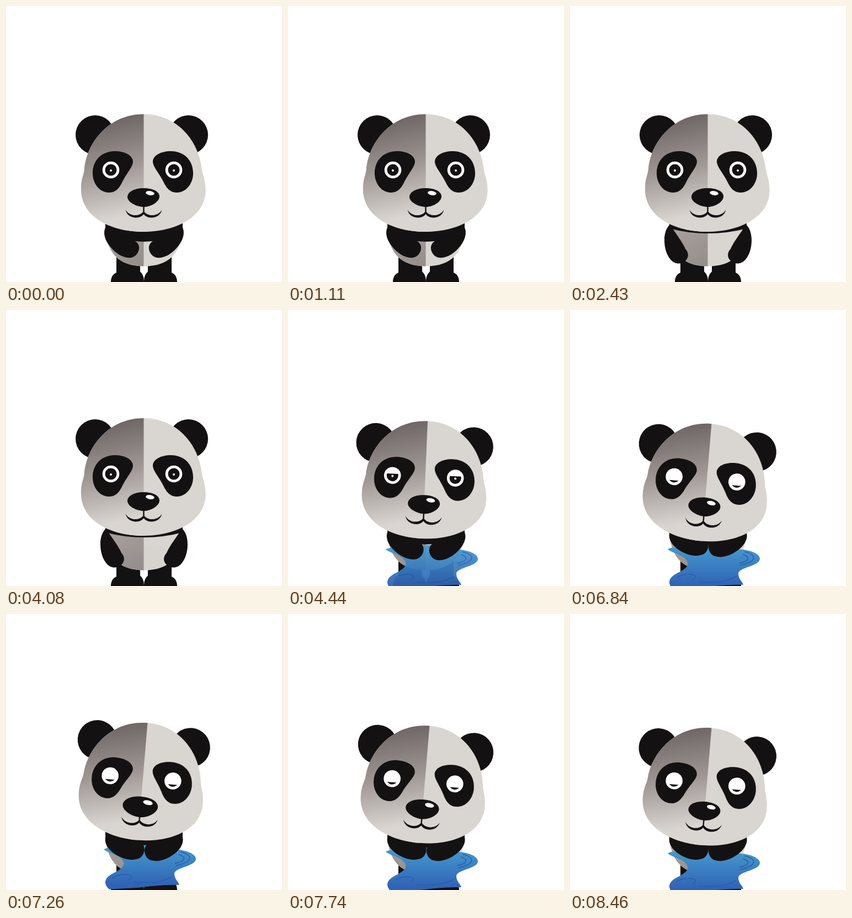
Recreate the animation shown at these times as an HTML page. Size 500 by 500 pixels, loop 9000 ms.

```html
<!DOCTYPE html>
<html lang="en">
<head>
<meta charset="utf-8">
<title>Sleepy panda</title>
<style>
  html, body { margin: 0; width: 100%; height: 100%; overflow: hidden; background: #fff; }
  svg { display: block; width: 100%; height: 100%; }
</style>
</head>
<body>
<svg viewBox="0 0 500 500">
  <defs>
    <linearGradient id="shade" gradientUnits="userSpaceOnUse" x1="187" y1="207" x2="227" y2="378">
      <stop offset="0" stop-color="#6f6765"/>
      <stop offset=".5" stop-color="#9f9794"/>
      <stop offset="1" stop-color="#d9d5d1"/>
    </linearGradient>
    <linearGradient id="water" gradientUnits="userSpaceOnUse" x1="0" y1="427" x2="0" y2="500">
      <stop offset="0" stop-color="#459bce"/>
      <stop offset="1" stop-color="#2f62b4"/>
    </linearGradient>
    <linearGradient id="belly" gradientUnits="userSpaceOnUse" x1="195" y1="400" x2="240" y2="472">
      <stop offset="0" stop-color="#a8a09d"/>
      <stop offset="1" stop-color="#968e8b"/>
    </linearGradient>
    <clipPath id="leftHalf"><rect x="100" y="150" width="149.5" height="350"/></clipPath>
    <clipPath id="lidClip"><rect id="lid" x="-12" width="24" height="30"/></clipPath>

    <path id="skull" d="M249 196C312 196 350 246 355 297C356 307 361.500 313 361.500 334C361.500 382 308 409 249 409C190 409 136 382 136 332C136 312 141 307 142 295C147 246 187 196 249 196Z"/>
    <path id="patch" d="M197 263C216 263 230 271 230 282C230 291 219 302 211 318C206 329 199 338 187 338C169 338 157 321 157 303C157 279 174 263 197 263Z"/>
    <path id="tummy" d="M180 395C180 447 204 471.500 250 471.500C296 471.500 320 447 320 395Z"/>
    <path id="arm" d="M188 392C176 396 171 410 171 424C171 440 176 455 186 463C194 469 206 467 212 458C216 451 213 444 209 440C205 430 196 418 187 405Z"/>
    <path id="leg" d="M200 440V483C193 486 190 492 190 500H250C250 491 248 486 243 481V440Z"/>
    <g id="eye">
      <circle r="15.300" fill="#fff"/>
      <g clip-path="url(#lidClip)">
        <circle r="10.500" fill="#141112"/>
        <circle r="2" cy="1" fill="#fff"/>
      </g>
    </g>
  </defs>

  <g fill="#141112">
    <use href="#leg"/>
    <use href="#leg" transform="matrix(-1 0 0 1 500 0)"/>
    <use href="#tummy" fill="#d9d5d1"/>
    <use href="#tummy" fill="url(#belly)" clip-path="url(#leftHalf)"/>
    <path id="collar"/>

    <g id="pool">
      <path fill="url(#water)" d="M177 434C184 428 200 431 215 431C235 429 240 426 252 426C275 426 290 430 306 434C326 434 344 442 344 451C343 465 305 466 305 478C305 487 312 492 314 498C290 498 270 499 240 503L187 506C174 494 180 483 198 475C209 469 215 464 213 457C207 443 190 443 177 434Z"/>
      <g fill="none" stroke="#285fae" stroke-width="1.600">
        <path d="M316 438C337 443 342 455 308 463"/>
        <path d="M313 443C328 448 325 455 306 459"/>
        <path d="M192 486C208 474 240 479 222 489"/>
        <path d="M232 493Q277 497 301 483"/>
      </g>
    </g>

    <use id="armL" href="#arm"/>
    <g transform="matrix(-1 0 0 1 500 0)"><use id="armR" href="#arm"/></g>

    <g id="head">
      <circle id="earL" cx="161.500" cy="233.500" r="35.500"/>
      <circle id="earR" cx="330.500" cy="233.500" r="35.500"/>
      <use href="#skull" fill="#d9d5d1"/>
      <use href="#skull" fill="url(#shade)" clip-path="url(#leftHalf)"/>
      <use href="#patch"/>
      <use href="#patch" transform="matrix(-1 0 0 1 496 0)"/>
      <use href="#eye" x="190" y="297"/>
      <use href="#eye" x="304" y="297"/>
      <g id="nose">
        <path d="M249 330C268 330 278 337 278 345C278 355 262 364 250 364C236 364 220 355 220 346C220 337 232 330 249 330Z"/>
        <ellipse cx="261" cy="339" rx="8" ry="3.800" fill="#fff" transform="rotate(8 261 339)"/>
      </g>
      <path d="M216.500 369C222 380 240 383 248.300 373V362H250.700V373C259 383 277 380 282.500 369C279 386 256 387 249.500 377C243 387 220 386 216.500 369Z"/>
    </g>
  </g>
</svg>
<script>
  const LOOP = 9000;
  const el = id => document.getElementById(id);
  const set = (id, name, value) => el(id).setAttribute(name, value);
  const span = (t, a, b) => Math.min(1, Math.max(0, (t - a) / (b - a)));
  const ease = (t, a, b) => { const k = span(t, a, b); return k * k * (3 - 2 * k); };
  const bump = (t, a, b) => Math.sin(Math.PI * span(t, a, b)) ** 2;
  const mix = (a, b, k) => a + (b - a) * k;

  function draw(t) {
    const nod = ease(t, 4080, 4790);
    const settle = ease(t, 4080, 4560);
    const breath = bump(t, 6780, 8000);

    // Head sinks and tilts into sleep, then lifts with one deep breath.
    const y = 10 * nod - 10.3 * breath;
    set('head', 'transform', `translate(${-1.5 * nod} ${y}) rotate(${4.8 * nod} 247 297)`);
    set('nose', 'transform', `translate(249 330) scale(${1 + 0.11 * breath}) translate(-249 -330)`);

    const droop = bump(t, 330, 1110) + bump(t, 1110, 1890) + settle - 1.05 * breath;
    set('earL', 'transform', `translate(${-5 * droop} ${6.5 * droop})`);
    set('earR', 'transform', `translate(${5 * droop} ${6.5 * droop})`);

    const shut = bump(t, 2190, 2430) + ease(t, 4080, 4860);
    set('lid', 'y', mix(-11, 6.5, shut));

    // Arms rest folded, open at the sides, then fold tighter for sleep.
    const open = ease(t, 2160, 2430) * (1 - settle);
    const wave = 38 - 19 * bump(t, 330, 1110) + 3 * bump(t, 1080, 2160);
    const turn = fold => `rotate(${-mix(wave, fold, settle) * (1 - open)} 195 405)`;
    set('armL', 'transform', turn(58));
    set('armR', 'transform', turn(54));
    const edge = mix(413, 403, open);
    set('collar', 'd', `M180 390H320V${edge}Q250 ${mix(441, 421, open)} 180 ${edge}Z`);

    set('pool', 'opacity', span(t, 4080, 4465));
    set('pool', 'transform', `translate(0 ${-8 * breath})`);
  }

  const start = performance.now();
  function tick() {
    draw((performance.now() - start) % LOOP);
    requestAnimationFrame(tick);
  }
  tick();
</script>
</body>
</html>
```
